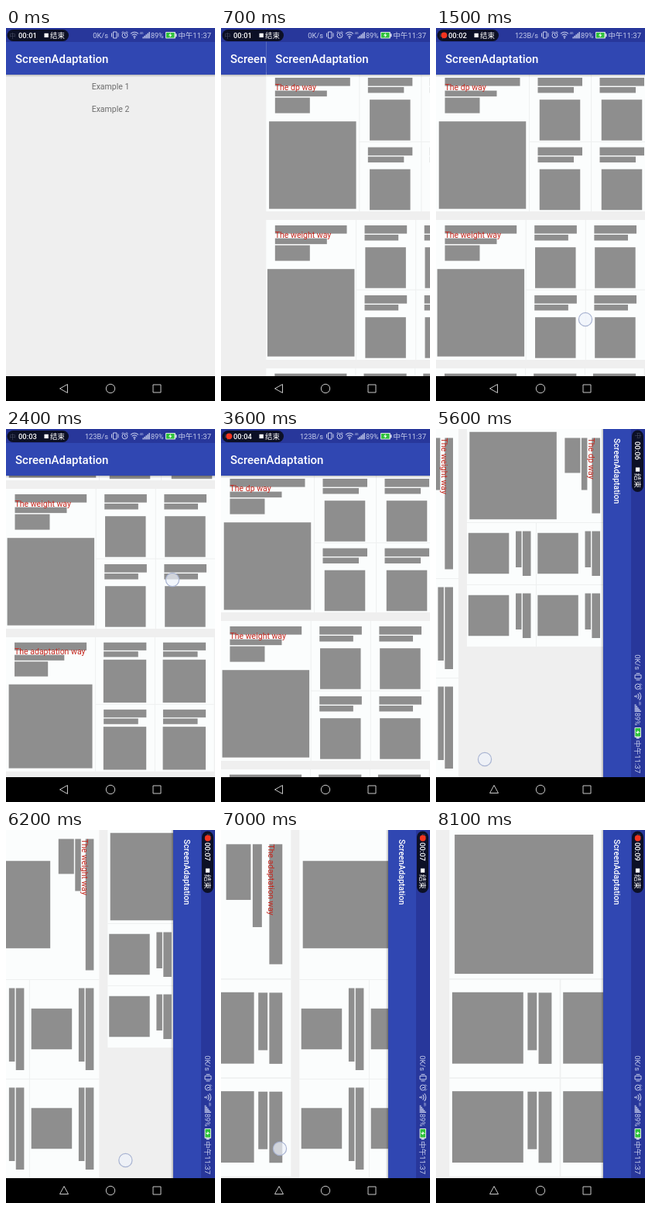
Animation, 270 px wide and 480 px high, one loop 8.2 s. Source, as an HTML page:

```html
<!DOCTYPE html>
<html lang="zh">
<head>
<meta charset="utf-8">
<title>ScreenAdaptation</title>
<style>
html, body { margin: 0; width: 100%; height: 100%; overflow: hidden; background: #000; }
svg { display: block; width: 100vw; height: 100vh; }
text { font-family: Roboto, "Noto Sans CJK SC", "Noto Sans CJK JP", sans-serif; white-space: pre; }
</style>
</head>
<body>
<svg id="stage" viewBox="0 0 270 480"></svg>
<script>
const LOOP = 8200, STEP = 100;
const W = 270, H = 480, BODY = 448, RATIO = H / W;
const BLUE = '#3047b2', DARK = '#28379b', BG = '#efefef', WHITE = '#fbfdfd';
const GREY = '#8e8e8e', LINE = '#eef0f0', RED = '#c4251c', PALE = '#c6cdec';
const stage = document.getElementById('stage');

function el(parent, tag, attrs, text) {
  const n = document.createElementNS('http://www.w3.org/2000/svg', tag);
  for (const k in attrs) n.setAttribute(k, attrs[k]);
  if (text) n.textContent = text;
  parent.appendChild(n);
  return n;
}
const group = (p, transform = '') => el(p, 'g', { transform });
const rect = (p, x, y, width, height, fill, rx = 0) => el(p, 'rect', { x, y, width, height, fill, rx });
const label = (p, x, y, s, size, fill, more) =>
  el(p, 'text', { x, y, 'font-size': size, fill, ...more }, s);
const stroke = (p, d, color, w = 1) =>
  el(p, 'path', { d, fill: 'none', stroke: color, 'stroke-width': w });
const show = (n, on) => n.setAttribute('visibility', on ? 'visible' : 'hidden');
const move = (n, x, y) => n.setAttribute('transform', `translate(${x} ${y})`);

// One wide side column and a 2 x 2 grid of cells, all scaled by k; returns the height
function card(parent, y, title, { side = 120, cell = 80, row = 90, big = 112.5, img = 52.5, k = 1 }) {
  const g = group(parent, `translate(0 ${y})`);
  const box = (x, y, w, h, fill = GREY) => rect(g, x * k, y * k, w * k, h * k, fill);
  const width = side + 2 * cell, height = 2 * row, padX = 11.5, bar = cell - 22.5;
  box(0, 0, width, height, WHITE);
  box(side, row - .5, width - side, 1, LINE);
  box(padX, 7, side - 2 * padX, 10.6);
  box(padX, 23.6, 67, 7.5);
  box(padX, 32.6, 45, 20);
  box((side - big) / 2, 63.2, big, big);
  for (let i = 0; i < 4; i++) {
    const x = side + cell * (i % 2), top = i < 2 ? 0 : row;
    box(x, top, 1, row, LINE);
    box(x + padX, top + 7, bar, 10.6);
    box(x + padX, top + 19, bar - 11, 7.5);
    box(x + (cell - img) / 2, top + 87.7 - img, img, img);
  }
  label(g, padX * k, 12 * k + 10.5, title, 10.5, RED);
  return height * k;
}

function cards(parent, width) {
  const list = group(parent), gap = 11;
  let y = 0;
  y += gap + card(list, y, 'The dp way', { row: 89.5 });
  y += gap + card(list, y, 'The weight way', { side: width * 3 / 7, cell: width * 2 / 7 });
  card(list, y, 'The adaptation way', { img: 57.7, k: width / (120 + 2 * 80) * .995 });
  return list;
}

function header(p, w, bar, size, base) {
  rect(p, 0, 0, w, 18 + bar, BLUE);
  rect(p, 0, 0, w, 18, DARK);
  for (let i = 0; i < 3; i++) rect(p, 0, 18 + bar + i, w, 1, `rgba(0,0,0,${.22 / 2 ** i})`);
  label(p, 12, base, 'ScreenAdaptation', size, '#fff', { 'font-weight': 500 });
}

function statusBar(parent, w) {
  const g = group(parent, `translate(${w - W} 0)`);
  const speed = label(g, 132, 12.8, '0K/s', 9.3, PALE, { 'text-anchor': 'end' });
  // vibrate
  stroke(g, 'M138.5 5h4.5v8h-4.5zM136.5 6.5v5M145 6.5v5', PALE);
  // alarm
  el(g, 'circle', { cx: 153.5, cy: 9.3, r: 3.5, fill: 'none', stroke: PALE });
  stroke(g, 'M153.5 7v2.6l1.6 1M149.5 6.2l2-2M157.5 6.2l-2-2', PALE);
  // wifi
  for (let i = 0; i < 3; i++) {
    const r = 5 - i * 1.7;
    stroke(g, `M${166 - r} ${7.3 + i * 2}q${r} ${-r * .84} ${2 * r} 0`, PALE, 1.1);
  }
  el(g, 'circle', { cx: 166, cy: 12.8, r: .9, fill: PALE });
  // signal
  label(g, 172.5, 8, '4G', 4.2, PALE);
  for (let i = 0; i < 5; i++) rect(g, 176.5 + i * 2, 11.5 - i * 1.6, 1.4, 1.9 + i * 1.6, PALE);
  // battery
  label(g, 187, 12.8, '89%', 9, PALE);
  rect(g, 206, 5, 13, 8.5, '#d8e4e0', 1);
  rect(g, 207, 6, 10.5, 6.5, '#2fc23c');
  rect(g, 219, 7.3, 1.6, 4, PALE);
  el(g, 'path', { d: 'M213 6l-3 3.8h2l-.6 2.8 3-3.8h-2z', fill: '#fff' });
  label(g, 265, 12.9, '中午11:37', 9.5, PALE, { 'text-anchor': 'end' });

  // recorder
  rect(parent, 1.5, 2, 79.5, 15, '#0c1026', 7.5);
  label(parent, 4.5, 12.5, '中', 8, '#454a60');
  const dot = el(parent, 'circle', { cx: 10.5, cy: 9.3, r: 3.9, fill: '#f2341f' });
  const clock = label(parent, 16, 13, '00:01', 9.4, '#fff', { 'font-weight': 500 });
  rect(parent, 49.5, 6.8, 5.3, 5.3, '#fff');
  label(parent, 57, 13, '结束', 9.4, '#fff');
  return { speed, dot, clock };
}

function navBar(parent, backTurn) {
  rect(parent, 0, BODY, W, H - BODY, '#000');
  const back = group(parent, `rotate(${backTurn} 75 464)`);
  stroke(back, 'M69.5 464l10-5.5v11z', '#c8c8c8');
  el(parent, 'circle', { cx: 135, cy: 464, r: 5.7, fill: 'none', stroke: '#c8c8c8' });
  stroke(parent, 'M190 459h10v10h-10z', '#c8c8c8');
}

rect(el(stage, 'clipPath', { id: 'screen' }), 0, 0, W, H);
const display = () => el(stage, 'g', { 'clip-path': 'url(#screen)' });

// Landscape display, drawn turned into the upright stage
const wide = display();
const turned = group(wide, `matrix(0 1 -1 0 ${W} 0)`);
rect(turned, 0, 0, BODY, W, BG);
const wideList = cards(turned, BODY);
header(turned, BODY, 36, 10.5, 40.5);
const wideStatus = statusBar(turned, BODY);
navBar(wide, 90);

// Portrait display
const tall = display();
const menu = group(tall);
rect(menu, 0, 0, W, H, BG);
['Example 1', 'Example 2'].forEach((s, i) =>
  label(menu, 135, 78.8 + i * 28.7, s, 10.5, '#6c6c6c', { 'text-anchor': 'middle' }));
header(menu, W, 42, 15, 45.3);
const page = group(tall);
rect(page, 0, 0, W, H, BG);
const tallList = cards(page, W);
header(page, W, 42, 15, 45.3);
const tallStatus = statusBar(tall, W);
navBar(tall, 0);

const finger = el(stage, 'circle', {
  r: 8.6, fill: '#eef2fb', 'fill-opacity': .7, stroke: '#a9b4d2', 'stroke-width': 1.2
});

const part = (t, a, b) => Math.max(0, Math.min(1, (t - a) / (b - a)));
const easeOut = (p, n) => 1 - (1 - p) ** n;
const smooth = (t, a, b) => { const p = part(t, a, b); return p * p * (3 - 2 * p); };
const mix = (a, b, p) => a + (b - a) * p;

// Turns a display about the stage centre while stretching it
function pose(node, angle, sx, sy) {
  node.setAttribute('transform',
    `translate(${W / 2} ${H / 2}) rotate(${angle}) scale(${sx} ${sy}) translate(${-W / 2} ${-H / 2})`);
}

function draw(t) {
  const sec = 1 + Math.floor((t + 50) / 1009);
  for (const s of [tallStatus, wideStatus]) {
    s.clock.textContent = '00:0' + sec;
    s.speed.textContent = t >= 1000 && t < 4000 ? '123B/s' : '0K/s';
  }
  show(tallStatus.dot, sec % 2 === 0);
  show(wideStatus.dot, sec % 2 === 1);

  // Opening the page, then dragging down and back up
  move(page, W * (1 - easeOut(part(t, 500, 1000), 3)), 0);
  const drag = smooth(t, 1500, 2400) - smooth(t, 2500, 3600);
  move(tallList, 0, 57 - 170 * drag);

  // Two flings in landscape
  const fling1 = 253 * smooth(t, 5625, 7040);
  const fling2 = 214 * smooth(t, 7000, 8150);
  move(wideList, 0, 51 - fling1 - fling2);

  // Screen rotation
  const turn = easeOut(part(t, 4234, 5034), 5);
  const fade = 1 - part(t, 4234, 4414);
  pose(wide, 90 * (turn - 1), mix(RATIO, 1, turn), mix(1 / RATIO, 1, turn));
  pose(tall, 90 * turn, mix(1, RATIO, turn), mix(1, 1 / RATIO, turn));
  tall.setAttribute('opacity', fade);
  show(wide, fade < 1);

  const during = (a, b) => t >= a && t < b;
  const at =
    during(200, 400) ? [137, 76] :
    during(1200, 3600) ? [193 + 22 * drag, 375 - 181 * drag] :
    during(5500, 6600) ? [63 + fling1, 425] :
    during(6900, 7600) ? [76 + fling2, 410] : null;
  show(finger, at);
  if (at) move(finger, ...at);
}

const start = performance.now();
function tick() {
  const t = (performance.now() - start) % LOOP;
  draw(Math.floor(t / STEP) * STEP);
  requestAnimationFrame(tick);
}
tick();
</script>
</body>
</html>
```
